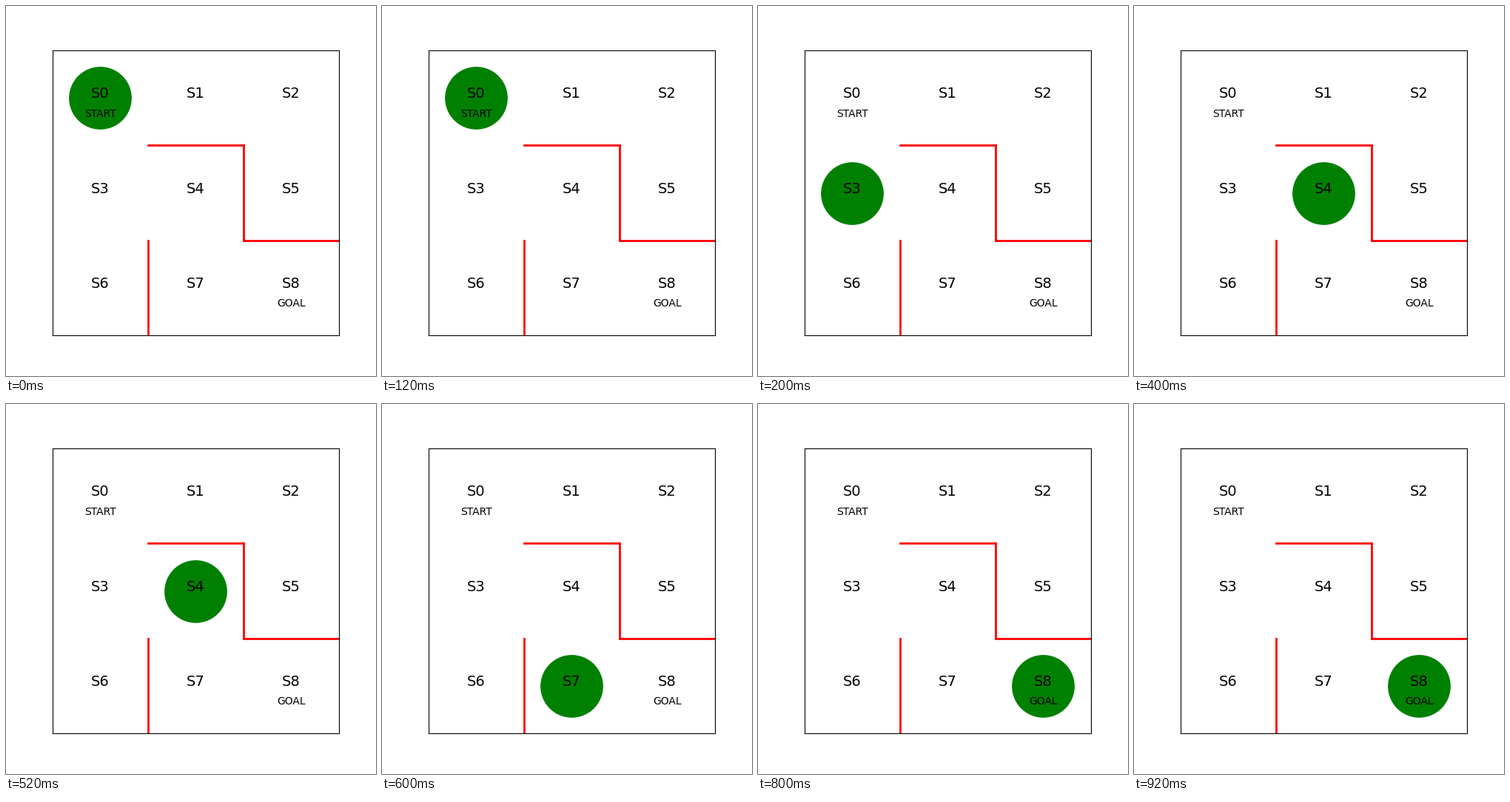
Animation of 500 by 500 pixels, one loop 1000 ms. Source, as a matplotlib script:

```python
import matplotlib.pyplot as plt
from matplotlib.animation import FuncAnimation

SIZE = 3
PATH = [0, 3, 4, 7, 8]
WALLS = [((1, 1), (0, 1)), ((1, 2), (2, 2)), ((2, 2), (2, 1)), ((2, 3), (1, 1))]


def cell_center(state):
    row, col = divmod(state, SIZE)
    return col + 0.5, SIZE - row - 0.5


def label(state, text, size, dy=0.0):
    x, y = cell_center(state)
    ax.text(x, y + dy, text, size=size, ha="center")


plt.rcParams["font.family"] = "DejaVu Sans"
fig = plt.figure(figsize=(5, 5), dpi=100)
ax = fig.gca()

for xs, ys in WALLS:
    ax.plot(xs, ys, color="red", linewidth=2)

for state in range(SIZE * SIZE):
    label(state, f"S{state}", 14)
label(PATH[0], "START", 10, -0.2)
label(PATH[-1], "GOAL", 10, -0.2)

ax.set_xlim(0, SIZE)
ax.set_ylim(0, SIZE)
ax.tick_params(bottom=False, left=False, labelbottom=False, labelleft=False)

agent, = ax.plot([0.5], [2.5], marker="o", color="g", markersize=60)


def update(frame):
    x, y = cell_center(PATH[frame])
    agent.set_data([x], [y])
    return (agent,)


anim = FuncAnimation(fig, update, frames=len(PATH), interval=200,
                     repeat=True, repeat_delay=0)
plt.show()
```
